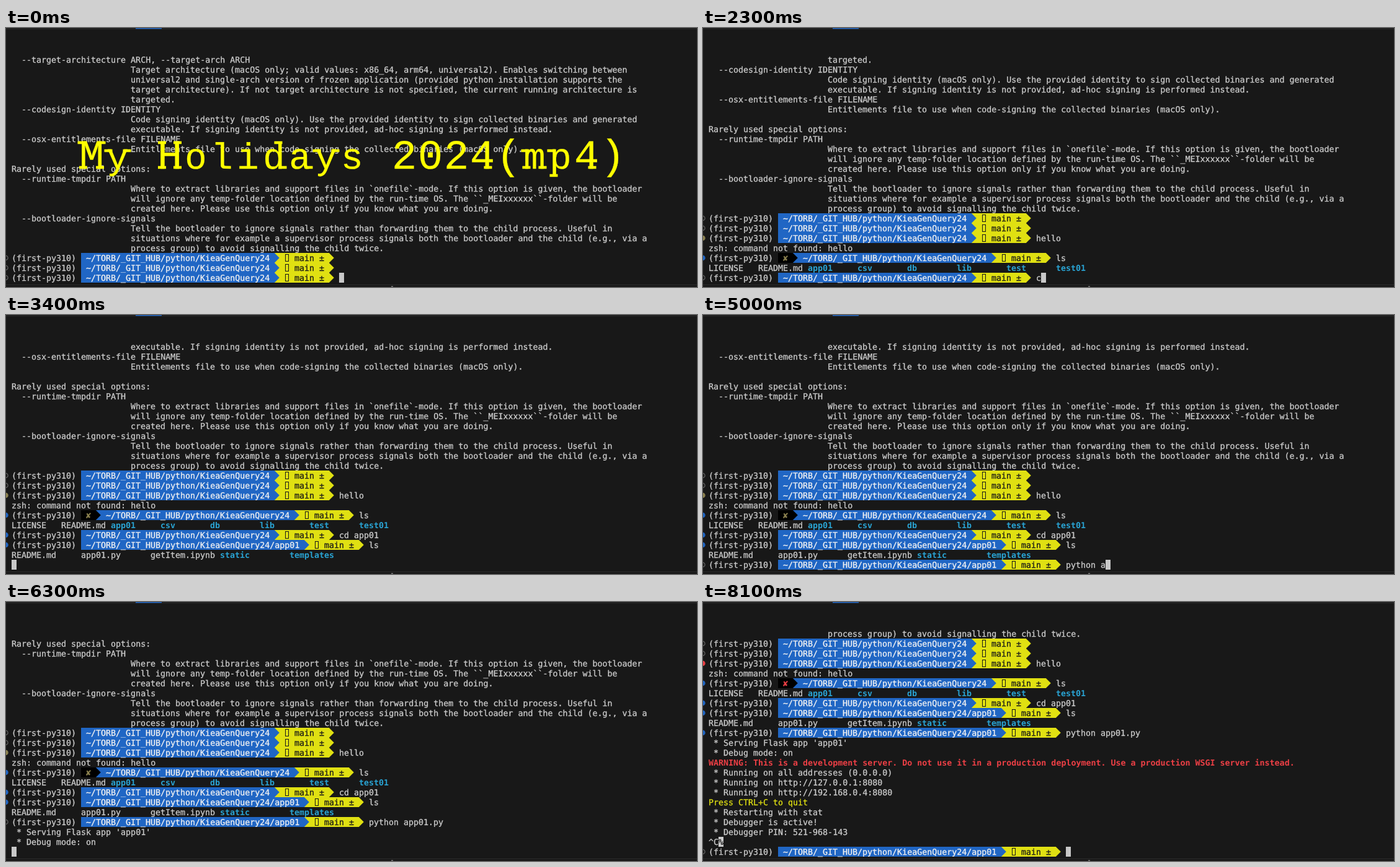
An HTML page for the animation above (8400 ms loop, 1114 by 418 pixels).

```html
<!DOCTYPE html>
<html lang="en">
<head>
<meta charset="utf-8">
<title>Terminal session</title>
<style>
html, body { margin: 0; width: 100%; height: 100%; overflow: hidden; background: #181818; }
svg { display: block; width: 100vw; height: 100vh; }
text {
  font: 13.3px "DejaVu Sans Mono", monospace; text-rendering: geometricPrecision; white-space: pre;
  fill: currentColor; stroke: currentColor; stroke-width: .3px;
}
.bold { font-weight: bold; stroke: none; }
.title { font-family: "Liberation Mono", monospace; }
</style>
</head>
<body>
<svg id="stage" viewBox="0 0 1114 418"></svg>
<script>
const LOOP = 8400, CELL = 8, LINE = 16, LEFT = 9, TOP = 43, LAST = 22;
const C = {
  bg: '#181818', text: '#cccccc', blue: '#2066c4', yellow: '#e0e012', cyan: '#29a3d3',
  red: '#ec3f45', olive: '#8c8250', grey: '#626262', white: '#f2f2f2', rule: '#2b2b2b'
};
const RED_AT = 6400, TITLE_END = 2000;
const HOME = '~/TORB/_GIT_HUB/python/KieaGenQuery24';

const help = `  --target-architecture ARCH, --target-arch ARCH
                        Target architecture (macOS only; valid values: x86_64, arm64, universal2). Enables switching between
                        universal2 and single-arch version of frozen application (provided python installation supports the
                        target architecture). If not target architecture is not specified, the current running architecture is
                        targeted.
  --codesign-identity IDENTITY
                        Code signing identity (macOS only). Use the provided identity to sign collected binaries and generated
                        executable. If signing identity is not provided, ad-hoc signing is performed instead.
  --osx-entitlements-file FILENAME
                        Entitlements file to use when code-signing the collected binaries (macOS only).

Rarely used special options:
  --runtime-tmpdir PATH
                        Where to extract libraries and support files in \`onefile\`-mode. If this option is given, the bootloader
                        will ignore any temp-folder location defined by the run-time OS. The \`\`_MEIxxxxxx\`\`-folder will be
                        created here. Please use this option only if you know what you are doing.
  --bootloader-ignore-signals
                        Tell the bootloader to ignore signals rather than forwarding them to the child process. Useful in
                        situations where for example a supervisor process signals both the bootloader and the child (e.g., via a
                        process group) to avoid signalling the child twice.`.split('\n');

const stage = document.getElementById('stage');
function el(parent, tag, attrs, content) {
  const node = document.createElementNS('http://www.w3.org/2000/svg', tag);
  for (const key in attrs) node.setAttribute(key, attrs[key]);
  if (content) node.textContent = content;
  return parent.appendChild(node);
}
const show = (node, on) => node.setAttribute('visibility', on ? 'visible' : 'hidden');
const px = col => LEFT + col * CELL;
const put = (g, col, str, color = C.text, cls = '') =>
  el(g, 'text', { x: px(col), y: 13, color, class: cls }, str);
const block = (g, col, n, fill) =>
  el(g, 'rect', { x: px(col), y: 0, width: n * CELL, height: LINE, fill });
const arrow = (g, col, fill) =>
  el(g, 'path', { d: `M${px(col) - .2} 0l8 8l-8 8z`, fill });

el(stage, 'rect', { width: 1114, height: 418, fill: C.bg });
el(stage, 'rect', { y: 1, width: 1114, height: 1, fill: C.rule });
el(stage, 'rect', { x: 209, width: 42, height: 1.5, fill: C.blue });
el(stage, 'rect', { y: 414, width: 1114, height: 1, fill: C.rule });
el(stage, 'rect', { x: 621, y: 416.5, width: 3, height: 1.5, fill: '#777' });
const screen = el(stage, 'g');

const rows = [], crosses = [];
function addRow(at, extra) {
  const g = el(screen, 'g', { transform: `translate(0 ${TOP + rows.length * LINE})` });
  const row = { g, at, ...extra };
  rows.push(row);
  return row;
}
function line(at, str, color, cls) {
  const col = Math.max(0, str.search(/\S/));
  put(addRow(at).g, col, str.trim(), color, cls);
}
// Columns of file names; a leading slash marks a folder.
function listing(at, step, names) {
  const { g } = addRow(at);
  names.split(' ').forEach((name, i) => {
    const dir = name[0] === '/';
    put(g, i * step, dir ? name.slice(1) : name, dir ? C.cyan : C.text, dir ? 'bold' : '');
  });
}
function prompt(at, { cmd = '', keys = [], enter = Infinity, done = enter, path = HOME, failed, bad } = {}) {
  const row = addRow(at, { cmd, keys: keys.map(k => k * 100), enter, done, bad, prompt: true });
  const g = row.g;
  row.dot = el(g, 'circle', { cx: -.5, cy: 8, r: 3.6, 'stroke-width': 1.3 });
  put(g, 0, '(first-py310)');
  const col = failed ? 18 : 14, from = failed ? 17 : 14;
  const end = col + path.length + 2;
  block(g, from, end - from, C.blue);
  if (failed) {
    block(g, 14, 3, '#000');
    arrow(g, 17, '#000');
    crosses.push(put(g, 15, '✘', C.olive));
  }
  put(g, col + 1, path, C.white);
  block(g, end, 11, C.yellow);
  arrow(g, end, C.blue);
  arrow(g, end + 11, C.yellow);
  el(g, 'rect', { x: px(end + 2) + 1.5, y: 2.5, width: 5, height: 11, fill: 'none', stroke: C.bg });
  put(g, end + 4, 'main ±', C.bg);
  row.col = end + 13;
  row.input = put(g, row.col, '');
}

help.forEach(str => line(0, str));
prompt(0);
prompt(0);
prompt(0, { cmd: 'hello', keys: [5, 6, 7, 9, 10], enter: 1300, bad: true });
line(1300, 'zsh: command not found: hello');
prompt(1400, { cmd: 'ls', keys: [17, 18], enter: 2000, failed: true });
listing(2000, 10, 'LICENSE README.md /app01 /csv /db /lib /test /test01');
prompt(2100, { cmd: 'cd app01', keys: [23, 24, 25, 26, 27, 27, 27, 27], enter: 3000 });
const path = HOME + '/app01';
prompt(3000, { path, cmd: 'ls', keys: [31, 32], enter: 3400 });
listing(3400, 14, 'README.md app01.py getItem.ipynb /static /templates');
prompt(3500, {
  path, cmd: 'python app01.py', enter: 5900, done: 7700,
  keys: [42, 42, 43, 43, 44, 44, 45, 50, 51, 52, 53, 54, 55, 56, 57]
});
line(6300, " * Serving Flask app 'app01'");
line(6300, ' * Debug mode: on');
line(RED_AT, 'WARNING: This is a development server. Do not use it in a production deployment. Use a production WSGI server instead.', C.red, 'bold');
line(RED_AT, ' * Running on all addresses (0.0.0.0)');
line(RED_AT, ' * Running on http://127.0.0.1:8080');
line(RED_AT, ' * Running on http://192.168.0.4:8080');
line(RED_AT, 'Press CTRL+C to quit', C.yellow);
line(RED_AT, ' * Restarting with stat');
line(6800, ' * Debugger is active!');
line(6800, ' * Debugger PIN: 521-968-143');
const stop = addRow(7400, { endCol: 2 });
put(stop.g, 0, '^C');
block(stop.g, 2, 1, C.text);
put(stop.g, 2, '%', C.bg, 'bold');
prompt(7700, { path });

const cursor = el(screen, 'rect', { width: CELL, height: LINE, fill: '#c8c8c8' });

// Typewriter caption: small lowercase on a wide pitch, with slab serifs added.
const PITCH = 42, X0 = 117, BASE = 227;
const title = el(stage, 'g', { color: '#ff0' });
const caption = el(title, 'text', { y: BASE, class: 'title' });
let at = 0;
for (const run of 'My Holidays 2024(mp4)'.match(/[a-z]+|[^a-z]+/g)) {
  const size = /[a-z]/.test(run) ? 59 : 67, gap = PITCH - size * .6;
  el(caption, 'tspan', {
    x: X0 + at * PITCH + gap / 2, 'font-size': size, 'letter-spacing': gap
  }, run);
  at += run.length;
}
const slab = (col, y, ...centres) =>
  centres.map(c => `M${X0 + col * PITCH + c - 6.5} ${y}h13`).join('');
const CAP = 185, MID = 198, FOOT = 225;
el(title, 'path', {
  stroke: '#ff0', 'stroke-width': 4.4, fill: 'none',
  d: slab(0, FOOT, 7.5, 34.5) + slab(0, CAP, 5, 37) +
     slab(3, FOOT, 8.5, 33.5) + slab(3, CAP, 8.5, 33.5) +
     slab(1, MID, 6, 36) + slab(9, MID, 6, 36) +
     slab(7, CAP, 28) + slab(7, FOOT, 35) + slab(8, FOOT, 35) +
     slab(15, FOOT, 30) + slab(19, FOOT, 30) +
     slab(17, MID, 6) + slab(17, FOOT, 8, 34) +
     slab(18, MID, 6) + slab(18, 238, 10)
});

function render(t) {
  let last = 0;
  rows.forEach((row, i) => { if (t >= row.at) last = i; });
  const row = rows[last];
  let curRow = last + 1, curCol = 0;
  if (row.prompt && t < row.enter) {
    curRow = last;
    curCol = row.col + row.keys.filter(k => k <= t).length;
  } else if (row.endCol) {
    curRow = last;
    curCol = row.endCol;
  }
  const scroll = Math.max(0, curRow - LAST);
  screen.setAttribute('transform', `translate(0 ${-scroll * LINE})`);
  cursor.setAttribute('x', px(curCol));
  cursor.setAttribute('y', TOP + curRow * LINE);

  const alert = t >= RED_AT ? C.red : C.olive;
  rows.forEach((r, i) => {
    show(r.g, t >= r.at && i >= scroll);
    if (!r.prompt) return;
    r.input.textContent = r.cmd.slice(0, r.keys.filter(k => k <= t).length);
    const done = t >= r.done, tone = !done ? C.grey : r.bad ? alert : C.blue;
    r.dot.setAttribute('stroke', tone);
    r.dot.setAttribute('fill', done ? tone : 'none');
  });
  crosses.forEach(x => x.setAttribute('color', alert));
  show(title, t < TITLE_END);
}

const start = performance.now();
function tick() {
  render((performance.now() - start) % LOOP);
  requestAnimationFrame(tick);
}
tick();
</script>
</body>
</html>
```
